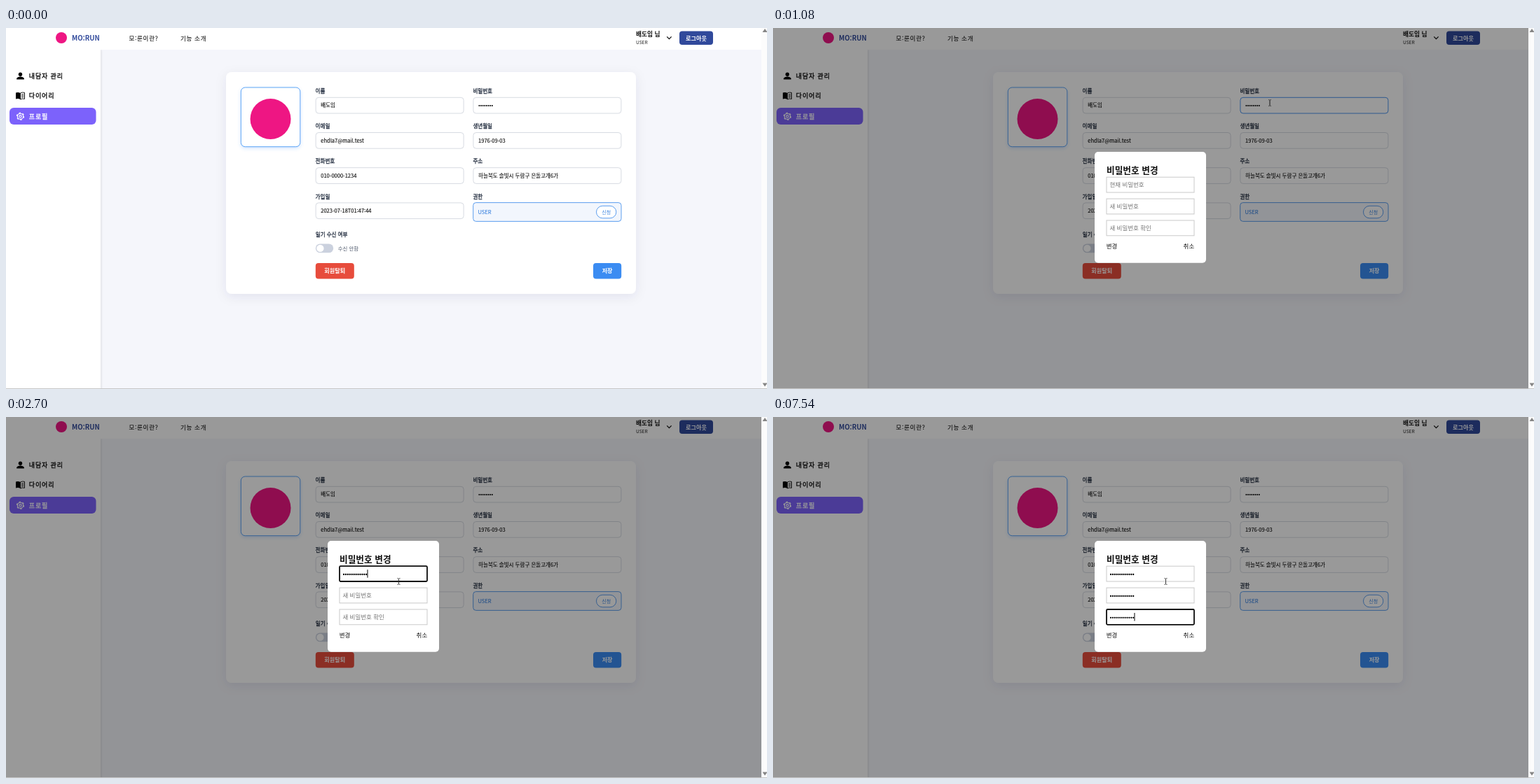
Recreate the animation shown at these times as an HTML page. Size 1086 px wide and 516 px high, loop 8 s.

```html
<!DOCTYPE html>
<html lang="ko">
<head>
<meta charset="utf-8">
<title>프로필</title>
<style>
  html, body { margin: 0; width: 100%; height: 100%; overflow: hidden; background: #fff; }
  svg { display: block; font-family: "Noto Sans CJK KR", "Noto Sans KR", "Noto Sans CJK JP", "Noto Sans", sans-serif; }
  text { white-space: pre; fill: currentColor; }
  /* a hairline stroke gives a medium weight between regular and bold */
  .nav, .side, .label, .value { stroke: currentColor; stroke-width: .14; }
  .nav { font-size: 8.5px; letter-spacing: .7px; color: #222; }
  .side { font-size: 9px; letter-spacing: .85px; color: #111; stroke-width: .36; }
  .label { font-size: 7.5px; color: #2d3748; stroke-width: .3; }
  .value { font-size: 7.5px; color: #111; }
  .btn { font-size: 8.1px; font-weight: 700; color: #fff; text-anchor: middle; }
  .hint { font-size: 8.5px; color: #757575; }
  .act { font-size: 8.5px; color: #111; }
  .box { fill: #fff; stroke: #d7dbe2; }
</style>
</head>
<body>
<svg width="1086" height="516" viewBox="0 0 1086 516">
  <defs>
    <filter id="soft" x="-10%" y="-10%" width="120%" height="125%">
      <feDropShadow dx="0" dy="4" stdDeviation="8" flood-color="#1c2450" flood-opacity=".08"/>
    </filter>
    <filter id="edge" x="-20%" y="-20%" width="140%" height="140%">
      <feDropShadow dx="0" dy="2" stdDeviation="2.5" flood-color="#3b82f6" flood-opacity=".22"/>
    </filter>
    <filter id="bar" x="-10%" y="-5%" width="120%" height="110%">
      <feDropShadow dx="1" dy="0" stdDeviation="1.5" flood-color="#000" flood-opacity=".1"/>
    </filter>
  </defs>

  <rect width="1078" height="516" fill="#f5f6fb"/>
  <rect y="31" width="135" height="490" fill="#fff" filter="url(#bar)"/>
  <rect width="1078" height="31" fill="#fff"/>

  <circle cx="79" cy="14" r="8" fill="#ee1683"/>
  <text x="94" y="18.3" font-size="9.6" font-weight="700" color="#30499b">MO:RUN</text>
  <text class="nav" x="175.5" y="18">모:룬이란?</text>
  <text class="nav" x="249" y="18">기능 소개</text>
  <text x="899" y="12" font-size="8.7" font-weight="700" color="#111">배도임 님</text>
  <text x="899" y="23.3" font-size="6.6" color="#222">USER</text>
  <path d="M943.2 12.4l3.2 3.2 3.2-3.2" fill="none" stroke="#111" stroke-width="1.3"/>
  <rect x="961" y="4.5" width="48" height="19.5" rx="4" fill="#30499b"/>
  <text class="btn" x="985" y="17.6">로그아웃</text>

  <circle cx="20.5" cy="66.2" r="2.7"/>
  <path d="M15.2 73.6v-1.3c0-1.9 3.4-2.9 5.3-2.9s5.3 1 5.3 2.9v1.3z"/>
  <path d="M14 92.4q3.5-1 6.5.6v9q-3-1.6-6.5-.6z"/>
  <path d="M20.5 93q3-1.6 6-.6v9q-3-1-6 .6zM22 95.3q1.5-.7 3.3-.5M22 97.3q1.5-.7 3.3-.5M22 99.3q1.5-.7 3.3-.5" fill="none" stroke="#000" stroke-width=".9"/>
  <rect x="5" y="114" width="123.5" height="24" rx="6" fill="#7c62fb"/>
  <g fill="none" stroke="#fff">
    <circle cx="20.5" cy="126.3" r="4.1" stroke-width="1.1"/>
    <circle cx="20.5" cy="126.3" r="5" stroke-width="1.3" stroke-dasharray="2.6 2.636"/>
    <circle cx="20.5" cy="126.3" r="1.7" stroke-width="1.1"/>
  </g>
  <text class="side" x="32.8" y="72.4">내담자 관리</text>
  <text class="side" x="32.8" y="100.3">다이어리</text>
  <text class="side" x="32.8" y="129.8" style="color:#fff">프로필</text>

  <rect x="314" y="63" width="585" height="317" rx="8" fill="#fff" filter="url(#soft)"/>
  <rect x="335.3" y="85" width="84.5" height="84.7" rx="6" fill="#fff" stroke="#4b9bf5" stroke-width=".9" filter="url(#edge)"/>
  <circle cx="377.5" cy="130" r="29" fill="#ee1683"/>

  <g id="form"></g>
  <rect x="666.7" y="249.6" width="211.3" height="26.8" rx="4" fill="#f2f6fd" stroke="#4b93ec" stroke-width=".9"/>
  <text class="value" x="673.5" y="265.9" style="color:#3f86e0">USER</text>
  <rect x="842.5" y="254.3" width="28.3" height="17.5" rx="8.75" fill="#fff" stroke="#4b93ec" stroke-width=".9"/>
  <text x="856.7" y="265.7" font-size="7" color="#3f86e0" text-anchor="middle">신청</text>

  <text class="label" x="441.8" y="298.3">일기 수신 여부</text>
  <rect x="441.8" y="308.5" width="25.4" height="12.8" rx="6.4" fill="#cbd1de"/>
  <circle cx="448.4" cy="314.9" r="5.2" fill="#fff"/>
  <text x="473.8" y="317.6" font-size="7.4" color="#4a5568">수신 안함</text>
  <rect x="441.8" y="336" width="55" height="22.5" rx="4" fill="#e74c3c"/>
  <text class="btn" x="469.2" y="350.4">회원탈퇴</text>
  <rect x="838" y="336" width="40.2" height="22.5" rx="4" fill="#3b8cf2"/>
  <text class="btn" x="858.1" y="350.4">저장</text>

  <g id="modal">
    <rect width="1078" height="515" fill="#000" fill-opacity=".4"/>
    <rect x="459" y="177" width="159" height="158.7" rx="5" fill="#fff"/>
    <text x="476" y="207.8" font-size="12.7" font-weight="700" color="#111">비밀번호 변경</text>
    <g id="inputs"></g>
    <text class="act" x="475.8" y="315.3">변경</text>
    <text class="act" x="585.6" y="315.3">취소</text>
  </g>

  <rect x="1078" width="8" height="516" fill="#fcfcfc"/>
  <path d="M1079.5 6l3.5-5 3.5 5zM1079.5 507.5l3.5 5 3.5-5z" fill="#858585"/>
  <rect y="515" width="1086" height="1" fill="#c6c6c6"/>

  <g id="mouse">
    <circle id="press" cx="-.4" cy=".4" r="8.7" fill="#f7ee20" fill-opacity=".64"/>
    <path id="arrow" d="M0 0v9.2l2.1-1.9 1.5 3.3 1.6-.7-1.5-3.2h2.9z" fill="#fff" stroke="#222" stroke-width=".8"/>
    <path id="beam" d="M-2-4.5q2 0 2 1v7q0 1-2 1M2-4.5q-2 0-2 1v7q0 1 2 1" fill="none" stroke="#333" stroke-width=".8"/>
  </g>
</svg>
<script>
const LOOP = 8000;
const $ = id => document.getElementById(id);
const show = (el, on) => el.setAttribute('visibility', on ? 'inherit' : 'hidden');
const dots = (n, x, y, step, r) =>
  Array.from({ length: n }, (_, i) => `<circle cx="${x + i * step}" cy="${y}" r="${r}"/>`).join('');

// Profile form: two columns of labelled boxes
const rows = [
  ['이름', '배도임', '비밀번호', ''],
  ['이메일', 'ehdla7@mail.test', '생년월일', '1976-09-03'],
  ['전화번호', '010-0000-1234', '주소', '하늘북도 솔빛시 두람구 은돌고개6가'],
  ['가입일', '2023-07-18T01:47:44', '권한', null]
];
const field = (x, row, label, value) => {
  const y = row * 50.2;
  const box = value === null ? '' :
    `<rect class="box" x="${x + .5}" y="${99.3 + y}" width="211" height="22.7" rx="4"/>
     <text class="value" x="${x + 7.7}" y="${113.3 + y}">${value}</text>`;
  return `<text class="label" x="${x}" y="${92.9 + y}">${label}</text>${box}`;
};
$('form').innerHTML = rows.map((r, i) =>
  field(441.6, i, r[0], r[1]) + field(666.4, i, r[2], r[3])).join('') + dots(8, 675.4, 111, 2.63, 1);
const secret = $('form').querySelectorAll('.box')[1];

// Password inputs: focus span and the moment each character arrives
const STEP = 2.93;
const inputs = [
  { hint: '현재 비밀번호', from: 2010, to: 3180, keys: Array(12).fill(2700) },
  { hint: '새 비밀번호', from: 3180, to: 5700,
    keys: [3660, 3860, 4090, 4240, 4870, 5020, 5180, 5250, 5320, 5380, 5450, 5600] },
  { hint: '새 비밀번호 확인', from: 5700, to: LOOP,
    keys: [5950, 6050, 6230, 6330, 6820, 6940, 7090, 7190, 7330, 7360, 7390, 7540] }
];
$('inputs').innerHTML = inputs.map((f, i) => {
  const y = 213.2 + i * 30.9;
  return `<g><rect x="476" y="${y}" width="125" height="21.8" fill="#fff"/>
    <text class="hint" x="480.4" y="${y + 14.2}">${f.hint}</text>
    <g>${dots(12, 482, y + 11.8, STEP, 1.15)}</g>
    <rect y="${y + 5}" width="1" height="11.5"/></g>`;
}).join('');
inputs.forEach((f, i) => [f.box, f.text, f.dots, f.caret] = $('inputs').children[i].children);

function drawInput(f, t) {
  const focus = t >= f.from && t < f.to;
  const typed = f.keys.filter(k => k <= t);
  const last = typed.length ? typed[typed.length - 1] : f.from;
  f.box.setAttribute('stroke', focus ? '#0c0c0c' : '#c9c9c9');
  f.box.setAttribute('stroke-width', focus ? 1.8 : 1);
  f.box.setAttribute('rx', focus ? 1.5 : 0);
  show(f.text, !typed.length);
  [...f.dots.children].forEach((d, i) => show(d, i < typed.length));
  f.caret.setAttribute('x', 480.3 + typed.length * STEP);
  show(f.caret, focus && (t - last) % 1060 < 530);
}

// Pointer path: time, x, y
const path = [
  [70, 1050, 491], [190, 985, 385], [310, 875, 215], [420, 765, 85], [530, 683, 23],
  [620, 682, 45], [720, 697, 85], [870, 709, 107], [1080, 709, 107], [1230, 709, 111],
  [1470, 709, 111], [1600, 681, 131], [1720, 633, 172], [1840, 588, 210],
  [1960, 565, 230], [2200, 560.5, 235]
];
function pointer(t) {
  const i = path.findIndex(p => p[0] > t);
  if (i < 1) return path[i < 0 ? path.length - 1 : 0].slice(1);
  const [t0, x0, y0] = path[i - 1], [t1, x1, y1] = path[i];
  const k = (t - t0) / (t1 - t0);
  return [x0 + (x1 - x0) * k, y0 + (y1 - y0) * k];
}
const within = (t, a, b) => t >= a && t < b;

function draw(t) {
  const [x, y] = pointer(t);
  const beam = within(t, 770, 1090) || t >= 1880;
  $('mouse').setAttribute('transform', `translate(${x} ${y})`);
  show($('mouse'), t >= 70);
  show($('beam'), beam);
  show($('arrow'), !beam);
  show($('press'), within(t, 910, 1040) || within(t, 1420, 1450) || within(t, 2010, 2110));
  show($('modal'), within(t, 1040, 1420) || t >= 1450);
  secret.style.stroke = within(t, 940, 1420) ? '#4b93ec' : within(t, 1450, 1560) ? '#a0a4ac' : '';
  inputs.forEach(f => drawInput(f, t));
}

const start = performance.now();
function tick() {
  draw((performance.now() - start) % LOOP);
  requestAnimationFrame(tick);
}
tick();
</script>
</body>
</html>
```
